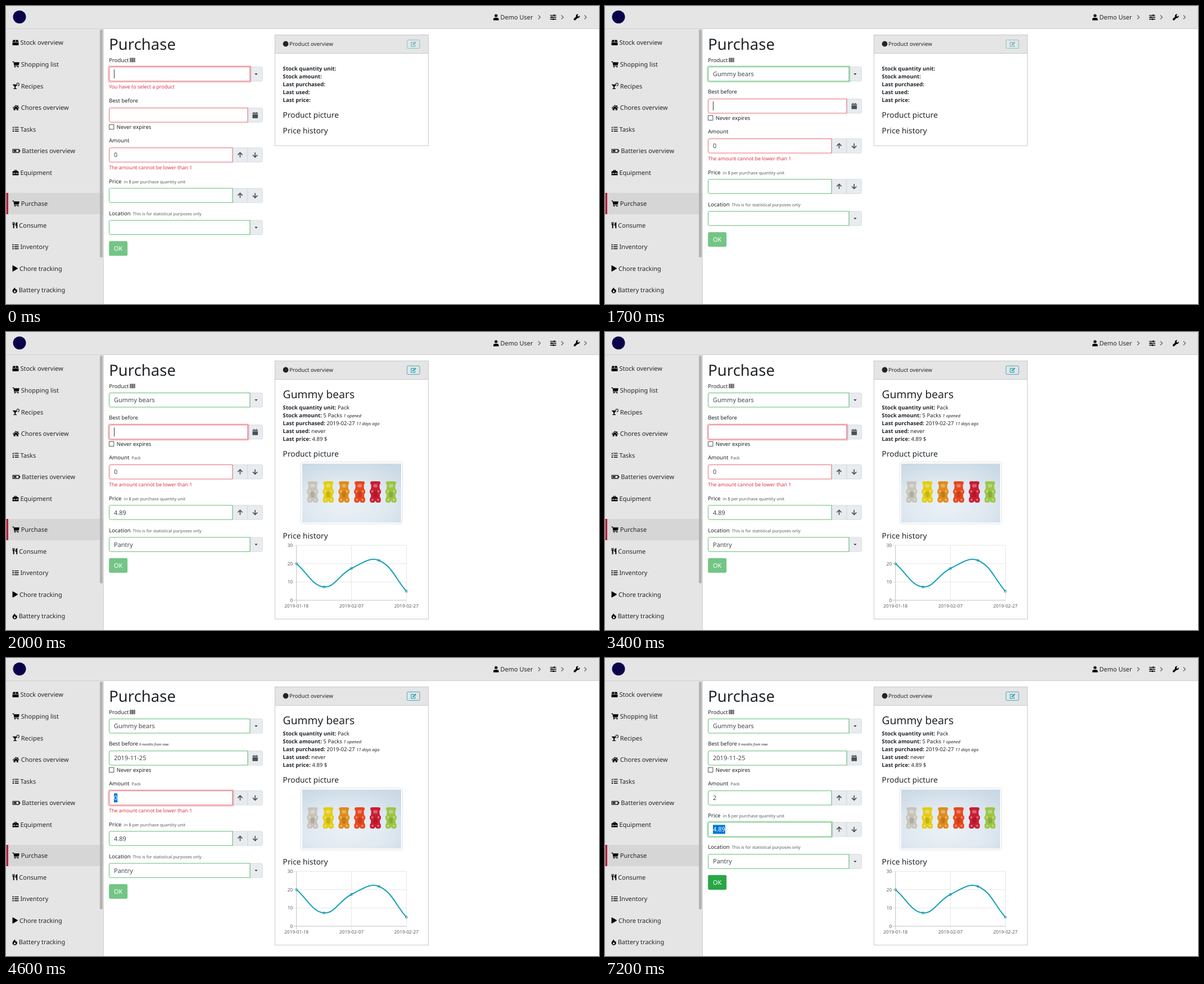
An HTML page that plays this animation: 1055x531 px, repeating every 8000 ms.

```html
<!DOCTYPE html>
<html lang="en">
<head>
<meta charset="utf-8">
<title>Purchase form</title>
<style>
  html, body { margin: 0; width: 100%; height: 100%; overflow: hidden; background: #fff; }
  svg { display: block; width: 100%; height: 100%; }
  text { font-family: "Noto Sans", "Open Sans", sans-serif; fill: #212529; text-rendering: geometricPrecision; white-space: pre; }
  .b { font-weight: 700; }
  .i { font-style: italic; }
</style>
</head>
<body>
<svg id="stage" viewBox="0 0 1055 531"></svg>
<script>
const LOOP = 8000, SHIFT = 16.1, ROW = 25.4, EDGE = .75;
const INK = "#212529", MUTED = "#495057", RED = "#dc3545", GREEN = "#28a745", TEAL = "#17a2b8", BLUE = "#0078d7";

const stage = document.getElementById("stage");
const pen = document.createElement("canvas").getContext("2d");
const widthOf = s => { pen.font = '11px "Noto Sans", "Open Sans", sans-serif'; return pen.measureText(s).width; };

// value that holds at time t: a first value, then [start, value] pairs
const pick = (t, first, ...steps) => steps.reduce((v, [at, x]) => t >= at ? x : v, first);

const text = (x, y, size, s, more = "") => `<text x="${x}" y="${y}" font-size="${size}" ${more}>${s}</text>`;
const rect = (x, y, w, h, fill, more = "") => `<rect x="${x}" y="${y}" width="${w}" height="${h}" fill="${fill}" ${more}/>`;
const path = (d, more = "") => `<path d="${d}" ${more}/>`;
const line = (d, color, w = 1, more = "") => path(d, `fill="none" stroke="${color}" stroke-width="${w}" ${more}`);
const dot = (x, y, r, fill, more = "") => `<circle cx="${x}" cy="${y}" r="${r}" fill="${fill}" ${more}/>`;
const move = (x, y, s, scale = 1) => `<g transform="translate(${x} ${y}) scale(${scale})">${s}</g>`;

// box with its own radius on the left (l) and right (r) side
const box = (x, y, w, h, l, r) =>
  `M${x + l} ${y}h${w - l - r}q${r} 0 ${r} ${r}v${h - 2 * r}q0 ${r} ${-r} ${r}h${l + r - w}q${-l} 0 ${-l} ${-l}v${2 * l - h}q0 ${-l} ${l} ${-l}z`;

// icons are drawn 16 units high
const icons = {
  box: path("M0 6L2 1h5.300v5zM8.700 1H14l2 5H8.700zM0 7.300h16V14q0 1-1 1H1q-1 0-1-1z"),
  cart: path("M0 .5h3.600l.5 2H18l-1.700 7.500H5.800l.4 1.500h9.600V13H4.900L2.500 2H0z") + dot(6.5, 14.3, 1.7, INK) + dot(14.3, 14.3, 1.7, INK),
  cocktail: path("M0 4h13.500L8 10v4h3v2H2.500v-2h3v-4z") + line("M10.500 3a3.500 3.500 0 1 1 3 4.500", INK, 1.7),
  home: path("M9 1L0 9l1 1.300 8-7 8 7L18 9l-3-2.700V2.300h-2v2.200zM3 9.800V15h4.500v-4h3v4H15V9.800L9 4.600z"),
  tasks: path("M6 2h10v2H6zM6 7h10v2H6zM6 12h10v2H6zM.5 11.500h3v3h-3z") + line("M0 3l1.700 1.500L4.500 1.500M0 8l1.700 1.500L4.500 6.500", INK, 1.5),
  battery: line("M1.200 4h15.600v8H1.200z", INK, 2.2) + path("M17.500 6H20v4h-2.500zM3.500 6H10v4H3.500z"),
  toolbox: path("M0 6l2-2h2.500V2.500L6 1h4l1.500 1.500V4H14l2 2v3.500h-3.500v-1h-2v1h-5v-1h-2v1H0zM6.300 2.800V4h3.400V2.800zM0 10.500h3.500v1h2v-1h5v1h2v-1H16V15H0z", 'fill-rule="evenodd"'),
  utensils: path("M0 0h1.300v5h1V0h1.400v5h1V0H6v6L4.500 8.300V16H1.700V8.300L0 6zM12.700 0v16H10v-6H7.800V5q.5-4 4.900-5z"),
  list: path([2, 7, 12].map(y => `M0 ${y - .5}h3v3h-3zM5 ${y}h11v2H5z`).join("")),
  play: path("M0 1q0-1.300 1.300-.8l12 7q.9.800 0 1.600l-12 7Q0 16.300 0 15z"),
  fire: path("M6 0q-.5 3 2 5 1 1 1 2.500 1-1 1-2.500 2.500 3 2 6-1 5-6 5t-6-5.500Q0 7 3 4.500 5.500 2.500 6 0zM6 8q-3 2.500-2.500 4.500Q4 14 6 14t2.500-2Q8.500 10 6 8z", 'fill-rule="evenodd"'),
  user: dot(7, 4, 4, INK) + path("M0 16v-2q0-4.500 4-4.500h6q4 0 4 4.500v2z"),
  sliders: path("M0 2h16v2H0zM0 7h16v2H0zM0 12h16v2H0zM9.500.8h2.500v4.400H9.500zM3.500 5.800H6v4.400H3.500zM7.500 10.800H10v4.400H7.500z"),
  wrench: path("M15.700 3.700l-2.500 2.500-2.900-.5-.5-2.900L12.300.300Q9 -.6 7 1.500T6.200 6L.7 11.500q-1.500 1.800 0 3.700 1.900 1.500 3.700 0L10 9.800q2.500.8 4.500-1.300t1.200-4.800z"),
  up: line("M8 14.500V2.500M2 8l6-6 6 6", MUTED, 2.4),
  down: line("M8 1.500v12M2 8l6 6 6-6", MUTED, 2.4),
  calendar: path("M0 5V3q0-1 1-1h2V0h2v2h4V0h2v2h2q1 0 1 1v2zM0 6h14v9q0 1-1 1H1q-1 0-1-1z", `fill="${MUTED}"`),
  edit: line("M10 3H1.500v11.500h11V9.500", TEAL, 1.7) + path("M6 8.300L13.500.800 16 3.300 8.500 10.800 5.500 11.300z", `fill="${TEAL}"`),
  barcode: path([[0, 1], [1.7, .8], [3.5, 2], [6.5, .8], [8, 1.6], [10.5, .9], [12.2, 1.8], [15, 1]].map(([x, w]) => `M${x} 1.500h${w}v13h-${w}z`).join(""))
};
const icon = (name, x, mid, scale = .6875) => move(x, mid - 8 * scale, icons[name], scale);

// name, icon, icon width in em, middle
const menu = [
  ["Stock overview", "box", 1, 65.3], ["Shopping list", "cart", 1.125, 104], ["Recipes", "cocktail", 1.125, 142.5],
  ["Chores overview", "home", 1.125, 181], ["Tasks", "tasks", 1, 219.6], ["Batteries overview", "battery", 1.25, 258.2],
  ["Equipment", "toolbox", 1, 296.8], ["Purchase", "cart", 1.125, 352], ["Consume", "utensils", .8125, 390.5],
  ["Inventory", "list", 1, 429], ["Chore tracking", "play", .875, 467.6], ["Battery tracking", "fire", .75, 506.2]
];

function frame() {
  const chevron = x => line(`M${x - 2} 16.500l3.500 3.500-3.500 3.500`, "#6b6b6b", 1.4);
  return rect(0, 0, 1055, 40, "#e5e5e5") + rect(0, 40, 1055, 1, "#cfcfcf")
    + rect(0, 41, 173, 490, "#e5e5e5") + rect(173, 41, 1, 490, "#cfcfcf")
    + rect(0, 333, 173, 38, "#d6d6d6") + rect(.6, 333, 3.4, 38, "#b2203c")
    + rect(167, 42, 5, 406, "#b3b3b3", 'rx="2.500"')
    + dot(24, 19.5, 11.5, "#0b034a")
    + menu.map(([name, pic, w, mid]) => icon(pic, 11.5, mid) + text(14.4 + 11 * w, mid + 4, 11, name)).join("")
    + icon("user", 867, 20) + text(879.5, 24, 11, "Demo User")
    + icon("sliders", 968, 20) + icon("wrench", 1010, 20)
    + [949, 990, 1031].map(chevron).join("");
}

function addon(x, w, y, last, content) {
  return path(box(x, y, w, ROW, 0, last ? 2.5 : 0), `fill="#e9ecef" stroke="#ced4da" stroke-width="${EDGE}"`) + content;
}
const caretDown = y => path(`M442.300 ${y + 11.600}h5.400l-2.700 2.800z`, 'fill="#343a40"');
const spinner = y => addon(403, 27, y, false, icon("up", 411, y + 12.7)) + addon(430, 26.5, y, true, icon("down", 437.7, y + 12.7));

// ok runs from 0 (red) to 1 (green), glow from 0 to 1
function input(y, right, value, { ok = 1, glow = 0, caret = 0, sel = 0 } = {}) {
  const tone = `style="stroke:color-mix(in srgb, ${GREEN} ${ok * 100}%, ${RED})"`;
  const w = widthOf(value), edge = right - 183.6;
  return (glow ? path(box(182.1, y - 1.5, edge + 3, ROW + 3, 3.5, 1), `fill="none" stroke-width="2.300" stroke-opacity="${.25 * glow}" ${tone}`) : "")
    + path(box(183.6, y, edge, ROW, 2.5, 0), `fill="#fff" stroke-width="${EDGE}" ${tone}`)
    + (sel ? rect(192, y + 4.7, w, 16, BLUE) : "")
    + text(192, y + 16.7, 11, value, `style="fill:${sel ? "#fff" : "#42494f"}"`)
    + (caret ? rect(192 + w, y + 4.5, 1, 16, "#343a40") : "");
}

const label = (y, s) => text(183.2, y, 9.6, s);
const hint = (x, y, s) => text(x, y, 7.6, s, 'style="fill:#55615f"');
const error = (y, s) => text(183.2, y, 8.85, s, `style="fill:${RED}"`);

function form(t, loaded) {
  const focus = pick(t, "product", [1700, "date"], [4400, "amount"], [7000, "price"]);
  const blink = pick(t, 1, [100, 0], [600, 1], [1100, 0], [1300, 1], [2300, 0], [2800, 1],
    [3400, 0], [3500, 1], [3900, 0], [4000, 1]);
  const caret = name => focus === name && blink;
  const product = pick(t, "", [1300, "g"], [1400, "gu"], [1500, "gum"], [1600, "Gummy bears"]);
  const date = pick(t, "", [3500, "1"], [3600, "11"], [3900, "112"], [4300, "1125"], [4400, "2019-11-25"]);
  const known = t >= 1600, dated = t >= 4400, counted = t >= 6400;

  const top = text(183.2, 77.6, 27.5, "Purchase") + label(99.6, "Product")
    + `<g opacity=".8">${icon("barcode", 220, 96.3, .62)}</g>`
    + addon(434, 22.5, 108.5, true, caretDown(108.5))
    + input(108.5, 434, product, { ok: +known, glow: pick(t, 1, [1800, .5], [1900, 0]), caret: caret("product") })
    + (known ? "" : error(147.4, "You have to select a product"));

  const middle = label(156.2, "Best before")
    + (dated ? text(236.7, 156.2, 6.1, "9 months from now", 'class="i"') : "")
    + addon(430, 26.5, 165.6, true, icon("calendar", 438.5, 178.3))
    + input(165.6, 430, date, { ok: +dated, glow: pick(t, 0, [1800, .5], [1900, 1], [4500, .5], [4600, 0]), caret: caret("date") })
    + rect(183.6, 195.2, 8.3, 8.3, "#fff", 'stroke="#444" stroke-width=".9"') + text(196.7, 202.6, 9.6, "Never expires")
    + label(227.2, "Amount") + (loaded ? hint(223.3, 227.2, "Pack") : "")
    + spinner(236.6)
    + input(236.6, 403, counted ? "2" : "0", {
      ok: pick(t, 0, [6400, .4], [6500, .8], [6600, 1]),
      glow: pick(t, 0, [4500, .5], [4600, 1], [7100, .5], [7200, 0]),
      caret: counted && caret("amount"), sel: dated && !counted
    })
    + (counted ? "" : error(274.8, "The amount cannot be lower than 1"));

  const bottom = label(300.3, "Price") + hint(209.8, 300.3, "in $ per purchase quantity unit")
    + spinner(308.8)
    + input(308.8, 403, loaded ? "4.89" : "", { glow: pick(t, 0, [7100, .5], [7200, 1]), sel: focus === "price" })
    + label(356.6, "Location") + hint(225.6, 356.6, "This is for statistical purposes only")
    + addon(434, 22.5, 365.9, true, caretDown(365.9))
    + input(365.9, 434, loaded ? "Pantry" : "")
    + `<g opacity="${counted ? 1 : .65}">` + rect(183.2, 402.9, 33, 26.1, GREEN, 'rx="2.700"') + "</g>"
    + text(199.7, 420, 11, "OK", 'text-anchor="middle" style="fill:#fff"');

  return top + move(0, known ? 0 : SHIFT, middle + move(0, counted ? -SHIFT : 0, bottom));
}

function chart() {
  const x = i => 516.8 + 48.9 * i, y = v => 379.3 - v * 3.26;
  const pts = [20, 7.3, 17.4, 21.8, 4.9].map((v, i) => [x(i), y(v)]);
  // cubic spline with tension 0.4
  const control = (i, side) => {
    const p = pts[i], a = pts[i - 1] || p, b = pts[i + 1] || p;
    const da = Math.hypot(p[0] - a[0], p[1] - a[1]), db = Math.hypot(b[0] - p[0], b[1] - p[1]);
    const k = side * .4 * (side < 0 ? da : db) / (da + db);
    return [p[0] + k * (b[0] - a[0]), p[1] + k * (b[1] - a[1])];
  };
  const curve = pts.slice(1).map((p, i) => `C${control(i, 1)} ${control(i + 1, -1)} ${p}`).join("");
  const grey = 'style="fill:#5c5c5c"';
  return [0, 10, 20, 30].map(v => line(`M511 ${y(v)}H${x(4)}`, v ? "#e5e5e5" : "#bfbfbf") + text(510.3, y(v) + 2.8, 8.25, v, `text-anchor="end" ${grey}`)).join("")
    + ["2019-01-18", "2019-02-07", "2019-02-27"].map((d, i) =>
      line(`M${x(2 * i)} 281.500V385.500`, i ? "#e5e5e5" : "#bfbfbf") + text(x(2 * i), 392.6, 8.25, d, `text-anchor="middle" ${grey}`)).join("")
    + line(`M${pts[0]}${curve}`, TEAL, 2.1)
    + pts.map(([px, py]) => dot(px, py, 2.1, "#0001", `stroke="${TEAL}" stroke-width=".8"`)).join("");
}

function bear(x, color) {
  const part = (dx, dy, w, h) => rect(dx - w / 2, dy, w, h, color, 'rx="4"');
  const shine = (dx, dy, r) => dot(dx, dy, r, "#fff", 'opacity=".35"');
  return move(x, 266, part(0, 0, 15, 14) + dot(-6, 3, 3, color) + dot(6, 3, 3, color)
    + part(0, 10, 16, 25) + part(-6, 14, 8, 9) + part(6, 14, 8, 9) + part(-5, 28, 9.5, 10) + part(5, 28, 9.5, 10)
    + rect(-4, 5, 8, 6, "#fff", 'rx="3" opacity=".3"') + rect(-3.5, 18, 7, 11, "#000", 'rx="3.500" opacity=".12"')
    + shine(-5.5, 18, 2) + shine(5.5, 18, 2) + shine(-5, 33, 2) + shine(5, 33, 2));
}

function photo() {
  const colors = ["#c8c4b8", "#e3cd18", "#e08c1c", "#e6481e", "#cb1c33", "#9cc544"];
  return rect(524.5, 231.5, 181, 110.5, "#fff", 'rx="2.700" stroke="#dee2e6"')
    + `<defs><radialGradient id="light" cx=".45" cy=".7" r=".8"><stop offset="0" stop-color="#ebf1f6"/><stop offset=".5" stop-color="#e0e9f1"/><stop offset="1" stop-color="#c9d9e5"/></radialGradient></defs>`
    + rect(527, 234.5, 176, 105, "url(#light)")
    + colors.map((c, i) => bear(545.5 + 27.9 * i, c)).join("");
}

function card(loaded, pictured) {
  const bottom = pictured ? 511.5 : loaded ? 413 : 249;
  const small = s => `<tspan class="i" font-size="7.700">${s}</tspan>`;
  const facts = [
    ["Stock quantity unit:", "Pack"], ["Stock amount:", "5 Packs " + small("1 opened")],
    ["Last purchased:", "2019-02-27 " + small("11 days ago")], ["Last used:", "never"], ["Last price:", "4.89 $"]
  ];
  const lift = loaded ? 22.8 : 0, drop = pictured ? 98.7 : 0;
  return rect(478.5, 51.5, 273, bottom - 51.5, "#fff", 'stroke="#c9c9c9"')
    + rect(479, 52, 272, 32, "#e5e5e5") + rect(479, 84, 272, 1, "#c9c9c9")
    + dot(497.6, 67.5, 4.9, INK) + text(504.2, 70.9, 9.6, "Product overview")
    + `<g opacity="${loaded ? 1 : .65}">` + rect(713.4, 60.4, 22.6, 15.2, "none", `rx="2" stroke="${TEAL}" stroke-width=".8"`) + icon("edit", 720, 68, .62) + "</g>"
    + (loaded ? text(492.6, 117.6, 19.3, "Gummy bears") : "")
    + facts.map(([k, v], i) => text(492.6, 114.8 + lift + 14.05 * i, 9.6, `<tspan class="b">${k}</tspan>` + (loaded ? " " + v : ""))).join("")
    + text(492.6, 199 + lift, 13.75, "Product picture")
    + text(492.6, loaded ? 269.2 + drop : 226.6, 13.75, "Price history")
    + (pictured ? photo() : loaded ? dot(527, 239, 3.2, "#fff", 'stroke="#dee2e6"') : "")
    + (loaded ? move(0, drop, chart()) : "");
}

const still = frame();
let shown = -1;
function tick(now) {
  const t = Math.floor(now % LOOP / 100) * 100;
  if (t !== shown) {
    shown = t;
    stage.innerHTML = still + form(t, t >= 1800) + card(t >= 1800, t >= 2000);
  }
  requestAnimationFrame(tick);
}
tick(0);
</script>
</body>
</html>
```
